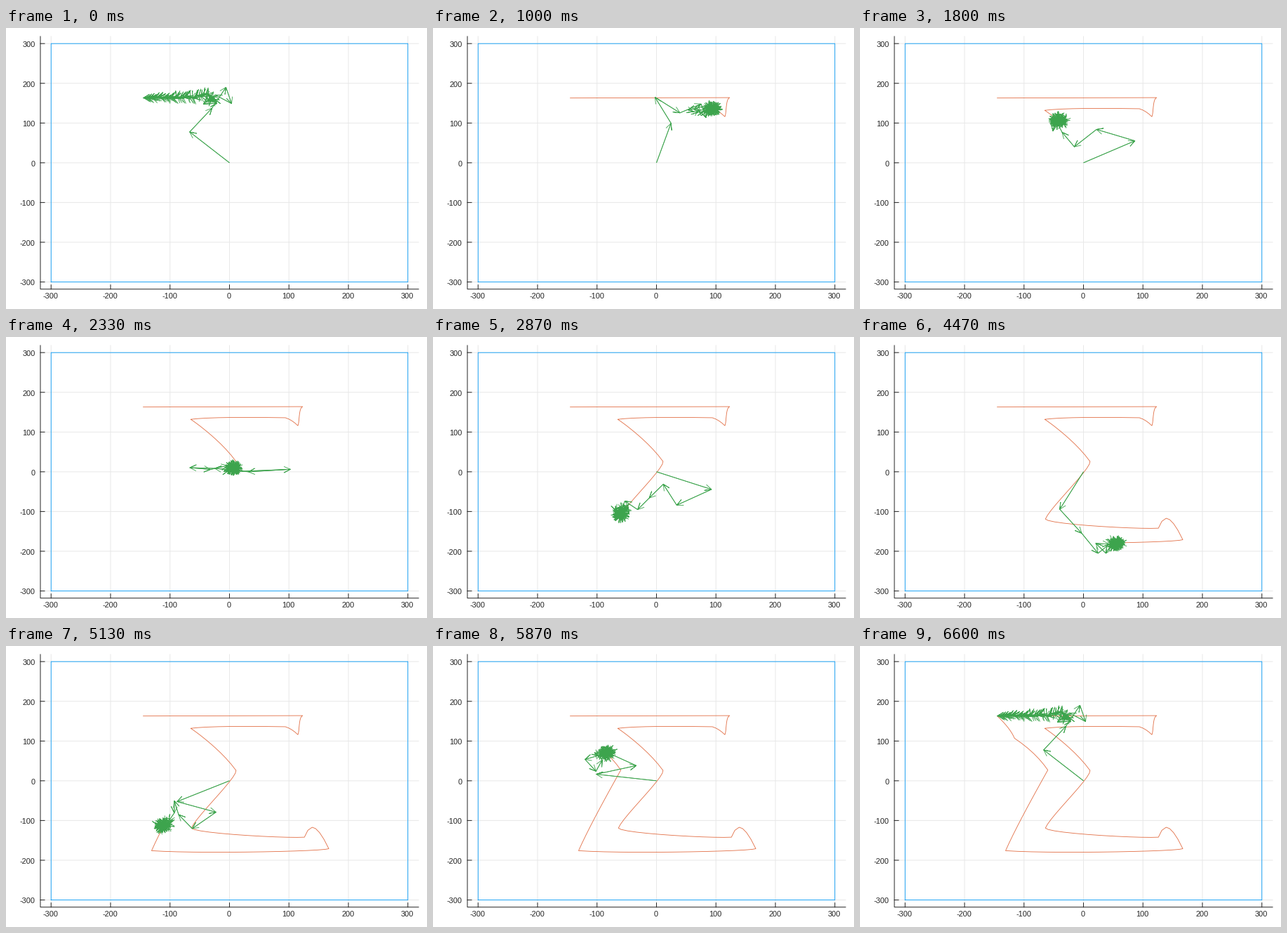
Recreate the animation shown at these times as a matplotlib script. Size 600 by 400 pixels, loop 6670 ms.

```python
from math import comb

import numpy as np
import matplotlib.pyplot as plt
from matplotlib.animation import FuncAnimation
from matplotlib.collections import LineCollection

W, H, DPI = 600, 400, 100
TICK_MS, TICKS = 23, 290            # 6670 ms loop
STEP_MS = 1000 / 15                 # the pose changes 15 times a second
LEFT, RIGHT, TOP, BOTTOM = 49, 588, 12, 371.7
LIMIT = 318
PX = 72 / DPI                       # one pixel in points
THIN = 0.85 * PX
BLUE, ORANGE, GREEN = "#009af9", "#e26f46", "#3da44d"
INK, GRID = "#262626", "#e8e8e8"

# Sigma as Bezier curves: (samples, control points..., end point)
START = -145 + 163j
CURVES = [
    (1, 123 + 164j),
    (10, 116 + 160j, 118 + 125j, 115 + 116j),
    (4, 105 + 131j, 94 + 136j),
    (7, -29 + 139j, -65 + 132j),
    (11, -66 + 133j, -17 + 84j, 11 + 26j),
    (11, 13 + 8j, -57 - 91j, -64 - 119j),
    (11, -60 - 132j, 90 - 145j, 126 - 142j),
    (2, 131 - 120j, 139 - 117j),
    (4, 150 - 117j, 167 - 171j),
    (13, 155 - 178j, -55 - 184j, -131 - 176j),
    (11, -111 - 108j, -68 + 5j, -60 + 27j),
    (6, -80 + 71j, -116 + 107j),
    (8, -123 + 132j, START),
]


def bezier(points, t):
    d = len(points) - 1
    return sum(comb(d, k) * t**k * (1 - t)**(d - k) * p
               for k, p in enumerate(points))


def sample_outline():
    pos, parts = START, []
    for count, *points in CURVES:
        parts.append(bezier([pos] + points, np.arange(count) / count))
        pos = points[-1]
    return np.concatenate(parts)


def to_px(z):
    """Plot coordinates (complex) to stage pixels (complex, y down)."""
    sx = (RIGHT - LEFT) / (2 * LIMIT)
    sy = (BOTTOM - TOP) / (2 * LIMIT)
    z = np.asarray(z)
    return ((LEFT + RIGHT) / 2 + sx * z.real
            + 1j * ((TOP + BOTTOM) / 2 - sy * z.imag))


def polylines(*points):
    z = np.stack(points, axis=1)
    return list(np.stack([z.real, z.imag], axis=-1))


# Fourier terms, largest first
outline = sample_outline()
N = len(outline)
coef = np.fft.fft(outline) / N
freq = np.fft.fftfreq(N, 1 / N)
order = np.argsort(-abs(coef), kind="stable")
coef, freq = coef[order], freq[order]
trail_px = to_px(np.append(outline, START))

fig = plt.figure(figsize=(W / DPI, H / DPI), dpi=DPI, facecolor="white")
ax = fig.add_axes([0, 0, 1, 1])
ax.set(xlim=(0, W), ylim=(H, 0))
ax.axis("off")


def stroke(x, y, color, z, lw=PX):
    return ax.plot(x, y, color=color, lw=lw, zorder=z, snap=False)[0]


def label(x, y, value, ha):
    ax.text(x, y, str(value), ha=ha, va="center_baseline", color=INK,
            family="Liberation Sans", fontsize=11 * PX)


for v in range(-300, 301, 100):
    p = to_px(v + 1j * v)
    stroke([p.real] * 2, [TOP, BOTTOM], GRID, 1)
    stroke([LEFT, RIGHT], [p.imag] * 2, GRID, 1)
    stroke([p.real] * 2, [BOTTOM, BOTTOM - 6], INK, 2)
    stroke([LEFT, LEFT + 6], [p.imag] * 2, INK, 2)
    label(p.real - 0.7, 381.3, v, "center")
    label(41.7, p.imag + 0.8, v, "right")
stroke([LEFT, LEFT, RIGHT], [TOP, BOTTOM, BOTTOM], INK, 2)

box = to_px(300 * np.array([-1 - 1j, 1 - 1j, 1 + 1j, -1 + 1j, -1 - 1j]))
stroke(box.real, box.imag, BLUE, 3, THIN)
trail = stroke([], [], ORANGE, 4, THIN)
arrows = LineCollection([], colors=GREEN, linewidths=THIN, zorder=5)
ax.add_collection(arrows)


def draw(tick):
    # round up to the next pose so that no change comes late
    i = min(int((tick * TICK_MS + TICK_MS + 3) / STEP_MS), N)
    steps = coef * np.exp(2j * np.pi * freq * i / N)
    joints = to_px(np.append(0, np.cumsum(steps)))
    tail, tip = joints[:-1], joints[1:]
    unit = (tip - tail) / np.maximum(abs(tip - tail), 1e-9)
    left, right = (tip + unit * (-9 + s * 4.3j) for s in (1, -1))
    # the shaft is stroked twice, the open head once
    arrows.set_segments(polylines(tail, tip)
                        + polylines(tail, tip, left, tip, right))
    done = trail_px[:i + 1]
    trail.set_data(done.real, done.imag)
    return trail, arrows


anim = FuncAnimation(fig, draw, frames=TICKS, interval=TICK_MS,
                     init_func=lambda: draw(0), repeat=True, repeat_delay=0,
                     blit=False)
plt.show()
```
